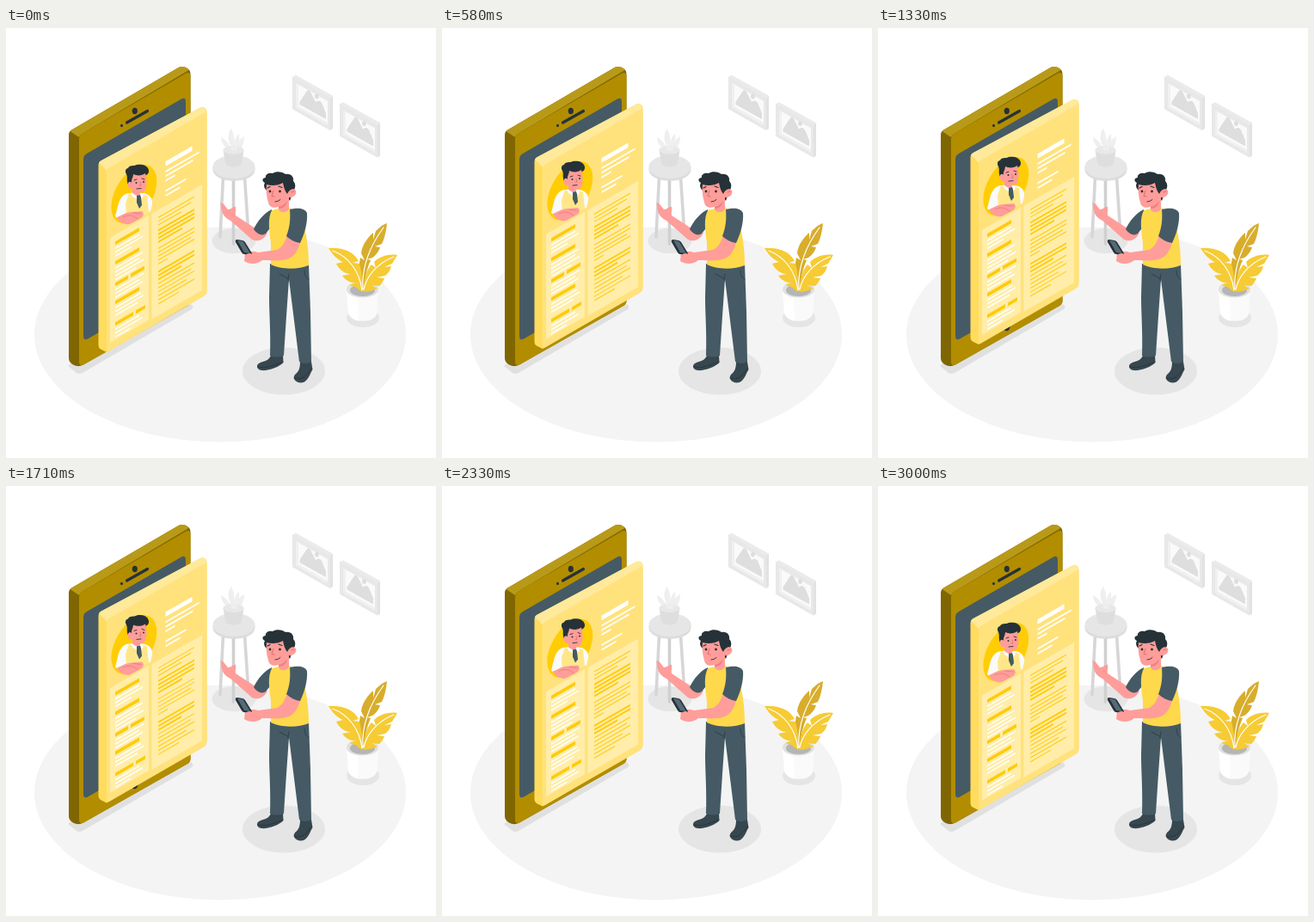
Animation, 500 px wide and 500 px high, one loop 3.04 s. Source, as an HTML page:

```html
<!DOCTYPE html>
<html lang="en">
<head>
<meta charset="utf-8">
<title>Online resume</title>
<style>
html, body { margin: 0; width: 100%; height: 100%; overflow: hidden; background: #fff; }
svg { display: block; width: 100%; height: 100%; }
.line { fill: none; stroke-linecap: round; stroke-linejoin: round; }
.skin { fill: #ff9d9a; }
.slate { fill: #455a64; }
.ink { fill: #263238; }
.shoe { fill: #37474f; }
.gold { fill: #fed94c; }
.leaf { fill: #f6cb34; }
</style>
</head>
<body>
<svg viewBox="0 0 500 500" xmlns="http://www.w3.org/2000/svg">
  <defs>
    <g id="picture">
      <path fill="#e2e2e2" d="M333 57L337 55L380 79V117L377 119L333 94Z"/>
      <path fill="#ebebeb" d="M333 57L337 55L380 79L377 82Z"/>
      <path fill="#e8e8e8" d="M333 57L377 82V119L333 94Z"/>
      <path fill="#fafafa" d="M337 64L374 85V113L337 92Z"/>
      <path fill="#f0f0f0" d="M337 64L340 66V91L374 110V113L337 92Z"/>
      <path fill="#dedede" d="M341.500 89V86L350 73Q352 71 354 74L360 86L363 84.500Q365 84 367 87L372 99V106Z"/>
      <ellipse cx="361.500" cy="79.500" rx="2.400" ry="3" fill="#dedede"/>
    </g>
    <clipPath id="disc"><path d="M120 150H178V211L160 222L142 229L122 222Z"/></clipPath>
  </defs>

  <g id="room">
    <ellipse cx="249" cy="356.500" rx="216" ry="125" fill="#f4f4f4"/>
    <ellipse cx="265" cy="247.500" rx="25.500" ry="14.500" fill="#e5e5e5"/>
    <ellipse cx="415" cy="337" rx="19" ry="11" fill="#e5e5e5"/>
    <ellipse cx="323" cy="399" rx="48" ry="27.500" fill="#e5e5e5"/>
    <path fill="#e0e0e0" d="M72 393L82 401Q85 403 89 401L216 327Q219 324 215 321L84 384Z"/>
    <use href="#picture"/>
    <use href="#picture" x="55" y="31.500"/>
  </g>

  <g id="table">
    <path class="line" stroke="#d6d6d6" stroke-width="3.600" d="M252.500 173L249 243M277.500 173L281.500 234"/>
    <path class="line" stroke="#d0d0d0" stroke-width="3.600" d="M264.500 176V251"/>
    <path fill="#dcdcdc" d="M240.500 162V165C242 182 288 182 289.500 165V162Z"/>
    <ellipse cx="265" cy="161.500" rx="24.500" ry="13.500" fill="#e6e6e6"/>
    <g fill="#efefef">
      <path d="M264 141C257 133 257 122 262 117C265 123 267 133 265 141Z"/>
      <path d="M262 141C259 134 255 129 250 127C250 134 255 140 261 142Z"/>
      <path d="M265 141C265 132 267 126 271 123C272 129 270 137 267 142Z"/>
      <path d="M267 142C268 134 271 129 277 126C277 134 274 140 269 143Z"/>
    </g>
    <path fill="#dedede" d="M252.500 142L255 157C257 163 272 163 274 157L276.500 142Z"/>
    <ellipse cx="264.500" cy="142" rx="12" ry="5" fill="#e8e8e8"/>
    <path fill="#efefef" d="M261 142L262 132L265 140L270 132L268 143Z"/>
  </g>

  <g id="phone">
    <path fill="#806600" d="M73 124Q73 119.500 78 117.500L198 47.500Q205 43 211 47Q214.500 49 214.500 54V317Q214.500 321 211 323L90 391.500Q84 395 78 391.500Q73 389 73 384Z"/>
    <path fill="#b99a18" d="M74.500 120L78 117.500L198 47.500Q205 43 211 47L212.500 49L89 122.500Q86 124 85 127Z"/>
    <path fill="#b28d00" d="M85 130Q85 125 89 122.500L207 54Q214.500 49 214.500 57V317Q214.500 321 211 323L91 391Q85 394 85 388Z"/>
    <path class="slate" d="M90 153Q90 148 94 146L204 82.500Q209 80 209 86V292Q209 296 205 298L95 361.500Q90 364 90 358Z"/>
    <g class="ink">
      <ellipse cx="149.800" cy="96.500" rx="3.100" ry="3.700"/>
      <ellipse cx="134.500" cy="113.500" rx="1.500" ry="1.800"/>
      <ellipse cx="149.500" cy="347" rx="4" ry="5.200"/>
    </g>
    <path class="line" stroke="#263238" stroke-width="3.200" d="M140.500 110L164.500 96.500"/>
  </g>

  <g id="card">
    <path fill="#ffdc5e" d="M107.500 159Q107.500 156 110 154.500L226 92.500Q229 91 231.500 93Q233.500 94.500 233.500 97V306L117 377L110 373.500Q107.500 372 107.500 369Z"/>
    <path fill="#ffe99a" d="M108 156.500L110 154.500L226 92.500Q229 91 231.500 93L233 95.500L232 99L119 164L117 166Z"/>
    <path fill="#ffe27c" d="M117 168Q117 164.500 120 162.500L230 99Q233.500 97 233.500 101V306Q233.500 310 230 312L120 375.500Q117 377 117 373Z"/>
    <g transform="translate(117 162) skewY(-30)">
      <g id="sheet"></g>
      <ellipse cx="31.800" cy="49.500" rx="26.500" ry="30.600" fill="#ffcd05"/>
    </g>
    <g id="portrait" clip-path="url(#disc)">
      <path class="ink" d="M143 184C139 177 142 174 140 170C138 167 139 163 142 163C143 159 149 161 152 159C157 158 163 159 165 163C167 166 166 170 163 171L148 185Z"/>
      <path class="skin" d="M146 177C147 174 148 172 148 170C152 172 158 172 162 169C164 176 164 183 162 188C161 191 158 192 156 191L156 197L147 196V187C142 188 140 181 143 179Q145 178 146 180Z"/>
      <path fill="#fafafa" d="M146 192C136 191 132 199 130 207L127 219L134 224L168 213L170 205C171 198 167 192 157 192L154 196Z"/>
      <path fill="#ffe789" d="M143 192L153 198L157 193L164 195L166 214L140 219L139 204Z"/>
      <path fill="#fff" d="M146 191L153 197L157 192L160 195L156 201L147 196Z"/>
      <path class="slate" d="M152 195L156 194L157 197L158 206L155 210L152 203Z"/>
      <path class="skin" d="M129 220C134 218 140 214 146 214L158 213C161 215 160 219 157 221L144 228C137 230 131 225 129 220Z"/>
      <path class="line" stroke="#e47c7d" stroke-width=".8" d="M136 220C143 216 148 218 153 222M148 215L157 216"/>
      <path class="line" stroke="#263238" stroke-width=".9" d="M149 177L152 176M158 175L161 176M152 187L157 186.500"/>
      <path class="line" stroke="#d96f70" stroke-width=".8" d="M156 179L157 183H155"/>
      <circle class="ink" cx="151.500" cy="180" r="1"/><circle class="ink" cx="160" cy="179" r="1"/>
    </g>
  </g>

  <g id="plant">
    <path fill="#fafafa" d="M396 304L398 331C400 344 430 344 431.500 331L433 304Z"/>
    <path fill="#fff" d="M396 304L398 331C399 336 405 340 410 340.500L408 304Z"/>
    <ellipse cx="414.500" cy="304" rx="18.500" ry="9.500" fill="#e0e0e0"/>
    <ellipse cx="414.500" cy="305" rx="14.500" ry="7" fill="#b5b5b5"/>
    <path fill="#d8ad2c" d="M414 307C411 294 409 281 412 267L417 270L413 262C414 252 421 243 427 238L427 246L430 236C435 231 439 228 443 227C442 237 440 245 437 251L429 254L435 255C433 261 429 265 426 267L420 269L424 270C421 277 419 283 418 290L416 307Z"/>
    <path class="leaf" d="M375 256C389 255 404 259 410 271L403 273L411 274C414 285 415 297 414 307L406 301L399 299L407 296C400 297 395 293 391 288L401 286C393 286 387 280 384 274L392 272C384 269 379 262 375 256Z"/>
    <path class="leaf" d="M455 264C443 262 433 267 428 272L430 279L425 275C419 281 417 292 415 307C422 306 428 305 432 303L425 299L434 300C437 297 439 294 440 291L431 290L441 288C445 285 447 281 448 277L440 278L449 274Z"/>
    <path class="line" stroke="#fff" stroke-width="1.200" d="M415 304C413 278 424 252 439 232M380 259C398 266 411 282 414 305M451 266C431 274 419 289 416 304"/>
  </g>

  <g id="man">
    <path class="shoe" d="M308 381L322 380L322.500 389C318 394 305 399 297 398C291 397 290 391 296 389C301 387 305 387 308 381Z"/>
    <path class="shoe" d="M342 388L355 388L356.500 397C354 401 352 409 346 412C338 414 332 408 336 403C340 400 342 396 342 388Z"/>
    <path class="line" stroke="#263238" stroke-width=".8" d="M293 394C301 397 313 392 322 388M335 407C343 411 350 404 355 396"/>
    <path class="slate" d="M307 274H352L354 330L355 388Q348 392 341 388L335 340L329 292L326 335L323 381Q315 384 307 381C308 355 306 332 306 313Z"/>
    <path class="line" stroke="#2f4149" stroke-width="1" d="M328.500 294L327.500 291L318 286M328 292L329 286M347 282C347 288 349 291 352 292"/>
    <path class="skin" d="M250 206C248 202 252 203 254 206L258 211C262 211 265 207 267 208C268 211 266 214 267 218L290 233L304 238C300 247 292 249 286 246L261 224C252 220 250 212 250 206Z"/>
    <path class="slate" d="M309 211C300 215 292 225 288 234C292 240 298 242 302 239L311 228Z"/>
    <path class="gold" d="M309 212L317 210L329 209L337 212L348 236C351 250 352 264 352 276C340 281 319 281 308 275V250C306 235 304 222 309 212Z"/>
    <path class="skin" d="M327 241L342 249C340 258 336 264 331 267C322 272 307 270 298 270C292 275 283 275 277 271L278 263C282 259 288 259 293 261L315 258C321 255 324 250 327 241Z"/>
    <path class="slate" d="M330 211C339 209 347 209 350 215C351 226 347 240 342 250C336 249 330 246 326 242C330 232 331 222 330 211Z"/>
    <path class="ink" d="M267 249Q266 246 269 246L275 247Q277 247.500 278 249L286 262Q286 264 283 264L277 263Q275 263 274 261Z"/>
    <path fill="#546a76" d="M269 247L275.500 248L284 262L277 261Z"/>
    <path class="skin" d="M277 265C280 262 284 261 286 263L292 264V272L285 272Z"/>
    <path class="ink" d="M303 189C299 185 300 182 301 180C297 178 298 174 302 174C301 170 306 168 310 169C314 166 322 167 325 170C332 169 335 174 334 178C338 182 336 187 334 190L330 201L322 190Z"/>
    <path class="skin" d="M303 182C310 184 317 183 322 180C323 185 324 189 327 193C329 188 334 185 337 189C339 193 334 198 329 197L329 210C326 216 319 215 317 211V208C311 210 306 208 305 203C303 196 302 189 303 182Z"/>
    <path fill="#ec8180" d="M317 208C322 207 325 204 327 201C326 207 322 210 317 210Z"/>
    <path class="line" stroke="#263238" stroke-width="1.200" d="M304 186L307 184.500M317 184L321 185.500"/>
    <path class="line" stroke="#d96f70" stroke-width="1" d="M311 189L309 195.500L312 196M332 191L335 190"/>
    <path class="line" stroke="#263238" stroke-width=".9" d="M313 202Q317 202 319 199.500"/>
    <circle class="ink" cx="307" cy="190" r="1.400"/><circle class="ink" cx="318.500" cy="190" r="1.400"/>
  </g>
</svg>
<script>
const sheet = document.getElementById('sheet');
const card = document.getElementById('card');
const YELLOW = '#ffcb0a', PALE = '#ffeda9', WHITE = '#fff';

// Sheet coordinates lie on the skewed front face.
function bar(x, y, w, h, fill) {
  const r = document.createElementNS('http://www.w3.org/2000/svg', 'rect');
  const box = { x, y: y - h / 2, width: w, height: h, fill };
  for (const key in box) r.setAttribute(key, box[key]);
  sheet.append(r);
}

function lines(x, y, gap, widths, h, fill) {
  widths.forEach((w, i) => bar(x, y + i * gap, w, h, fill));
}

bar(4, 145, 45, 122, PALE);
bar(52.5, 145.5, 58.5, 123, PALE);

bar(68.5, 35.5, 31, 5.5, WHITE);
lines(68.5, 44.5, 5.3, [39, 32, 11], 2, WHITE);
lines(68.5, 67, 5.5, [24, 17], 2, WHITE);

const sections = [
  [94, [28], [28, 32, 19]],
  [117, [28], [32, 28, 33, 24]],
  [142, [15, 16], [33, 28, 32]],
  [163, [28], [30, 33, 26]],
  [188, [21, 11], [28, 32, 18]]
];
for (const [y, heads, widths] of sections) {
  let x = 10;
  for (const w of heads) {
    bar(x, y, w, 4.2, YELLOW);
    x += w + 3;
  }
  lines(10, y + 6, 4.5, widths, 1.7, WHITE);
}

lines(60, 93, 4.4, [42, 38, 27], 1.2, YELLOW);
lines(60, 108, 4.5, [42, 42, 42, 28], 2.1, YELLOW);
lines(60, 129, 4.5, [42, 42, 38, 42, 11], 1.2, YELLOW);
lines(60, 156, 4.5, [42, 42, 27], 2.1, YELLOW);
lines(60, 170, 4.7, [42, 38, 42, 33, 42, 24], 1.2, YELLOW);

// Linear float: ten units up and back in three seconds, stepped at 24 fps.
const LOOP = 3040, RISE = 10, HALF = 36, STEP = 1000 / 24;
function draw(now) {
  const step = Math.floor((now % LOOP + 5) / STEP);
  const lift = Math.max(0, RISE * (1 - Math.abs(step - HALF) / HALF));
  card.setAttribute('transform', `translate(0 ${-lift})`);
  requestAnimationFrame(draw);
}
draw(performance.now());
</script>
</body>
</html>
```
